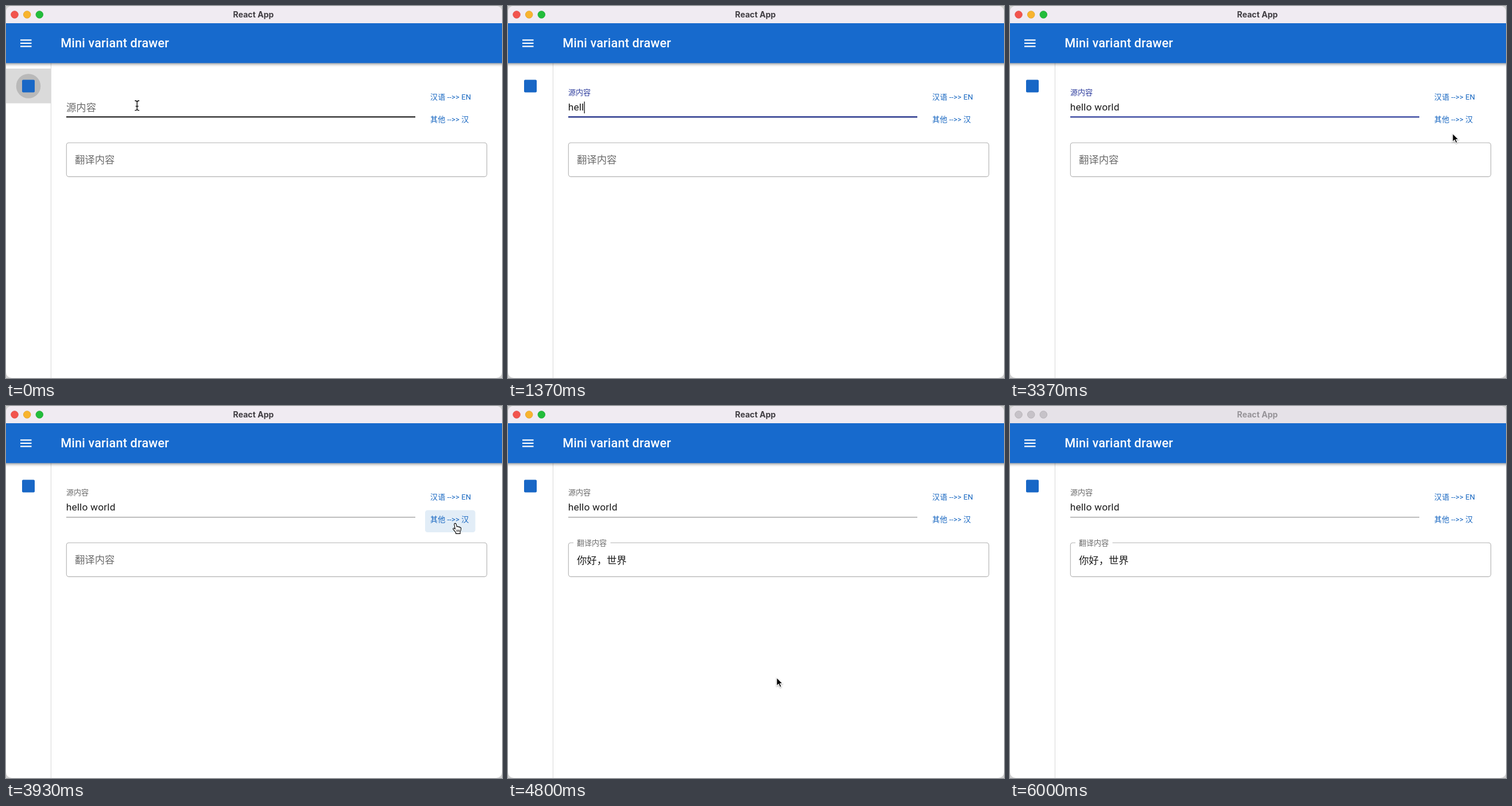
Write an HTML page that moves like this. It is 864 px wide and 648 px high and loops after 6.63 s.

```html
<!DOCTYPE html>
<html lang="zh-CN">
<head>
<meta charset="utf-8">
<title>React App</title>
<style>
html, body { margin: 0; width: 100%; height: 100%; overflow: hidden; background: #d2d2d2; }
svg { display: block; width: 864px; height: 648px; }
text { font-family: Roboto, "Noto Sans CJK SC", "Noto Sans CJK", sans-serif; white-space: pre; }
.body { font-size: 17.33px; letter-spacing: .00938em; fill: #1c1c1c; }
.cjk { font-family: "Noto Sans CJK SC", "Noto Sans CJK", sans-serif; letter-spacing: 0; }
.btn { font-size: 13px; fill: #1565c0; letter-spacing: .01em; }
#bar { filter: drop-shadow(0 2px 2.5px rgba(0, 0, 0, .42)); }
#winTitle { font: 700 14.1px Inter, sans-serif; }
</style>
</head>
<body>
<svg viewBox="0 0 864 648">
  <defs>
    <clipPath id="win"><rect width="864" height="648" rx="10"/></clipPath>
    <clipPath id="btnClip"><rect x="730" y="181.5" width="87.5" height="38.5" rx="4.3"/></clipPath>
  </defs>
  <g clip-path="url(#win)">
    <rect width="864" height="648" fill="#fff"/>
    <rect id="item" y="109" width="78" height="60.5" fill="#dadada"/>
    <circle id="pulse" cx="39" cy="139.5" r="21.3" fill="#b9b9b9"/>
    <rect x="28" y="128.5" width="22" height="22" rx="2" fill="#1867c6"/>
    <path d="M78.4 99V648" stroke="#dcdcdc" stroke-width="1.1"/>
    <rect id="bar" x="-10" y="29" width="884" height="70.4" fill="#176acd"/>
    <path d="M25 59.4H44.5M25 64.9H44.5M25 70.4H44.5" stroke="#fff" stroke-width="2.1"/>
    <text x="95.2" y="72.4" font-size="21.67" font-weight="500" letter-spacing=".16" fill="#fff">Mini variant drawer</text>

    <rect id="chrome" width="864" height="30"/>
    <g id="lights" stroke-width=".8">
      <circle cx="15" cy="15" r="6.3"/><circle cx="36.7" cy="15" r="6.3"/><circle cx="58.3" cy="15" r="6.3"/>
    </g>
    <text id="winTitle" x="431" y="19.6" text-anchor="middle">React App</text>

    <text id="srcLabel" class="cjk">源内容</text>
    <text id="typed" class="body" x="104.7" y="182.4"></text>
    <rect id="caret" y="166.5" width="1.2" height="20.5" fill="#000"/>
    <rect id="line" x="105" width="608"/>
    <rect id="focusLine" y="192.2" height="2.1" fill="#303f9f"/>

    <rect id="hover" x="730" y="181.5" width="87.5" height="38.5" rx="4.3" fill="#ecf3fa"/>
    <g clip-path="url(#btnClip)"><circle id="ripple" cx="783" cy="205" fill="#1565c0"/></g>
    <text class="btn" x="739" y="163.2">汉语 --&gt;&gt; EN</text>
    <text class="btn" x="739" y="202.2">其他 --&gt;&gt; 汉</text>

    <rect id="box" x="105.3" y="238.2" width="732.3" height="59.2" rx="4.3" fill="none" stroke-width="1.1"/>
    <rect id="notch" x="114" y="236.5" height="3.4" fill="#fff"/>
    <text id="outLabel" class="cjk" fill="#6b6b6b">翻译内容</text>
    <text id="result" class="body cjk" x="120" y="274.7">你好，世界</text>

    <g id="cursor">
      <g id="beam" fill="none" stroke-linecap="round">
        <path d="M-3.4 -8.2Q0 -8.2 0 -5.8Q0 -8.2 3.4 -8.2M0 -6V6.5M-3.4 8.7Q0 8.7 0 6.3Q0 8.7 3.4 8.7M-2 1.5H2" stroke="#fff" stroke-width="2.8"/>
        <path d="M-3.4 -8.2Q0 -8.2 0 -5.8Q0 -8.2 3.4 -8.2M0 -6V6.5M-3.4 8.7Q0 8.7 0 6.3Q0 8.7 3.4 8.7M-2 1.5H2" stroke="#000" stroke-width="1.3"/>
      </g>
      <path id="arrow" d="M0 0V14.6L3.4 11.5L5.7 16.8L8.3 15.7L6 10.5H10.4Z" fill="#000" stroke="#fff" stroke-width="1.1" style="filter:drop-shadow(0 1px 1px rgba(0,0,0,.35))"/>
      <g id="hand" stroke="#000" stroke-width="1.1" stroke-linejoin="round">
        <path d="M-2.2 1.2C-2.4 -1 .6 -1.4 1.2 .8L2.4 5.4C3 4.4 4.6 4.6 4.9 5.8C5.6 5 7 5.3 7.3 6.5C8.2 5.9 9.5 6.6 9.6 8C9.8 11 9 12.6 8.1 14.3V17.4H.6V15.6C-1.2 13.4 -2.6 11.5 -4 9.8C-4.9 8.6 -3.6 7.2 -2.2 8L-.6 9.4Z" fill="#fff"/>
        <path d="M2.2 10.5V14M4.4 10.5V14M6.6 10.5V14" stroke-width=".9"/>
      </g>
    </g>
  </g>
</svg>
<script>
const LOOP = 6630, CLICK = 70, SUBMIT = 3570, RESULT = 4190, INACTIVE = 5400;
const KEYS = [970, 1100, 1230, 1370, 1530, 1670, 1870, 2070, 2230, 2400, 2530];
const TEXT = "hello world";
const PATH = [
  [0, 228.3, 173.2], [2770, 228.3, 173.2], [2870, 300, 190], [3000, 520, 245], [3130, 690, 268],
  [3240, 760, 258], [3340, 771, 222], [3400, 771, 222], [3480, 778, 211], [3560, 783, 205],
  [4360, 783, 205], [4460, 760, 262], [4600, 620, 370], [4730, 490, 446], [4800, 468, 473],
  [5840, 468, 473], [5970, 49, 78]
];
const LIGHTS = [["#f2544d", "#dc4a44"], ["#f8b42e", "#e0a127"], ["#22bd3b", "#1ea634"]];

const el = {};
document.querySelectorAll("[id]").forEach(n => el[n.id] = n);
const set = (n, attrs) => { for (const k in attrs) n.setAttribute(k, attrs[k]); };
const show = (n, on) => set(n, { visibility: on ? "visible" : "hidden" });
const ramp = (t, start, len) => Math.min(1, Math.max(0, (t - start) / len));
const easeOut = p => 1 - Math.pow(1 - p, 2.6);
const mix = (a, b, p) => a + (b - a) * p;
const within = (p, x0, y0, x1, y1) => p.x >= x0 && p.x <= x1 && p.y >= y0 && p.y <= y1;

function mouseAt(t) {
  let i = 0;
  while (i < PATH.length - 2 && t >= PATH[i + 1][0]) i++;
  const [t0, x0, y0] = PATH[i], [t1, x1, y1] = PATH[i + 1];
  const p = ramp(t, t0, t1 - t0);
  return { x: mix(x0, x1, p), y: mix(y0, y1, p) };
}

function drawLabel(n, x, y0, y1, p) {
  set(n, { x, y: mix(y0, y1, p), "font-size": mix(17.33, 13, p) });
}

function drawWindow(t) {
  const off = t >= INACTIVE;
  set(el.chrome, { fill: off ? "#e6e2e8" : "#f0ebf2" });
  set(el.winTitle, { fill: off ? "#969398" : "#403d42" });
  [...el.lights.children].forEach((c, i) => {
    const [fill, stroke] = off ? ["#c6c2c8", "#b0adb2"] : LIGHTS[i];
    set(c, { fill, stroke });
  });
}

function drawSidebar(t) {
  set(el.item, { opacity: 1 - ramp(t, CLICK, 150) });
  set(el.pulse, {
    opacity: 1 - ramp(t, CLICK, 550),
    r: 21.3 * (1 - .04 * (1 - Math.cos(t / 2500 * 2 * Math.PI)))
  });
}

function drawField(t, hovered) {
  const focused = t >= CLICK && t < SUBMIT;
  const count = KEYS.filter(k => t >= k).length;
  const value = TEXT.slice(0, count);
  if (el.typed.textContent !== value) el.typed.textContent = value;
  drawLabel(el.srcLabel, 105, 182.6, 155.3, easeOut(ramp(t, CLICK, 200)));
  set(el.srcLabel, { fill: focused ? "#303f9f" : "#6b6b6b" });

  const since = t - (count ? KEYS[count - 1] : CLICK);
  show(el.caret, focused && since % 1000 < 500);
  set(el.caret, { x: 104.7 + (count ? el.typed.getComputedTextLength() : 0) });

  const bold = hovered || t < CLICK;
  set(el.line, { y: bold ? 192.2 : 193.2, height: bold ? 2.1 : 1.1, fill: bold ? "#1c1c1c" : "#8c8c8c" });
  const grow = focused ? easeOut(ramp(t, CLICK, 200)) : t < CLICK ? 0 : 1 - easeOut(ramp(t, SUBMIT, 200));
  set(el.focusLine, { x: 409 - 304 * grow, width: 608 * grow });
}

function drawButton(t) {
  set(el.hover, { opacity: ramp(t, 3470, 250) * (1 - ramp(t, 4390, 250)) });
  set(el.ripple, {
    r: 75 * easeOut(ramp(t, SUBMIT, 550)),
    opacity: t < SUBMIT ? 0 : .12 * (1 - ramp(t, SUBMIT + 80, 470))
  });
}

function drawOutput(t, hovered) {
  set(el.box, { stroke: hovered ? "#212121" : "#b3b3b3" });
  set(el.notch, { width: 64.5 * easeOut(ramp(t, RESULT + 30, 100)) });
  drawLabel(el.outLabel, 120, 273.9, 242.6, easeOut(ramp(t, RESULT, 200)));
  show(el.result, t >= RESULT);
}

function drawCursor(t, m, overText) {
  const visible = t < 1370 || (t >= 2770 && t < 5990);
  const overButton = within(m, 730, 143, 817, 220);
  set(el.cursor, { transform: `translate(${m.x} ${m.y})` });
  show(el.beam, visible && overText);
  show(el.hand, visible && overButton);
  show(el.arrow, visible && !overText && !overButton);
}

function draw(t) {
  const m = mouseAt(t);
  const onField = within(m, 105, 160, 713, 195);
  const onBox = within(m, 105, 238, 838, 298);
  drawWindow(t);
  drawSidebar(t);
  drawField(t, onField);
  drawButton(t);
  drawOutput(t, onBox);
  drawCursor(t, m, onField || onBox);
}

const start = performance.now();
function tick() {
  draw((performance.now() - start) % LOOP);
  requestAnimationFrame(tick);
}
tick();
</script>
</body>
</html>
```
